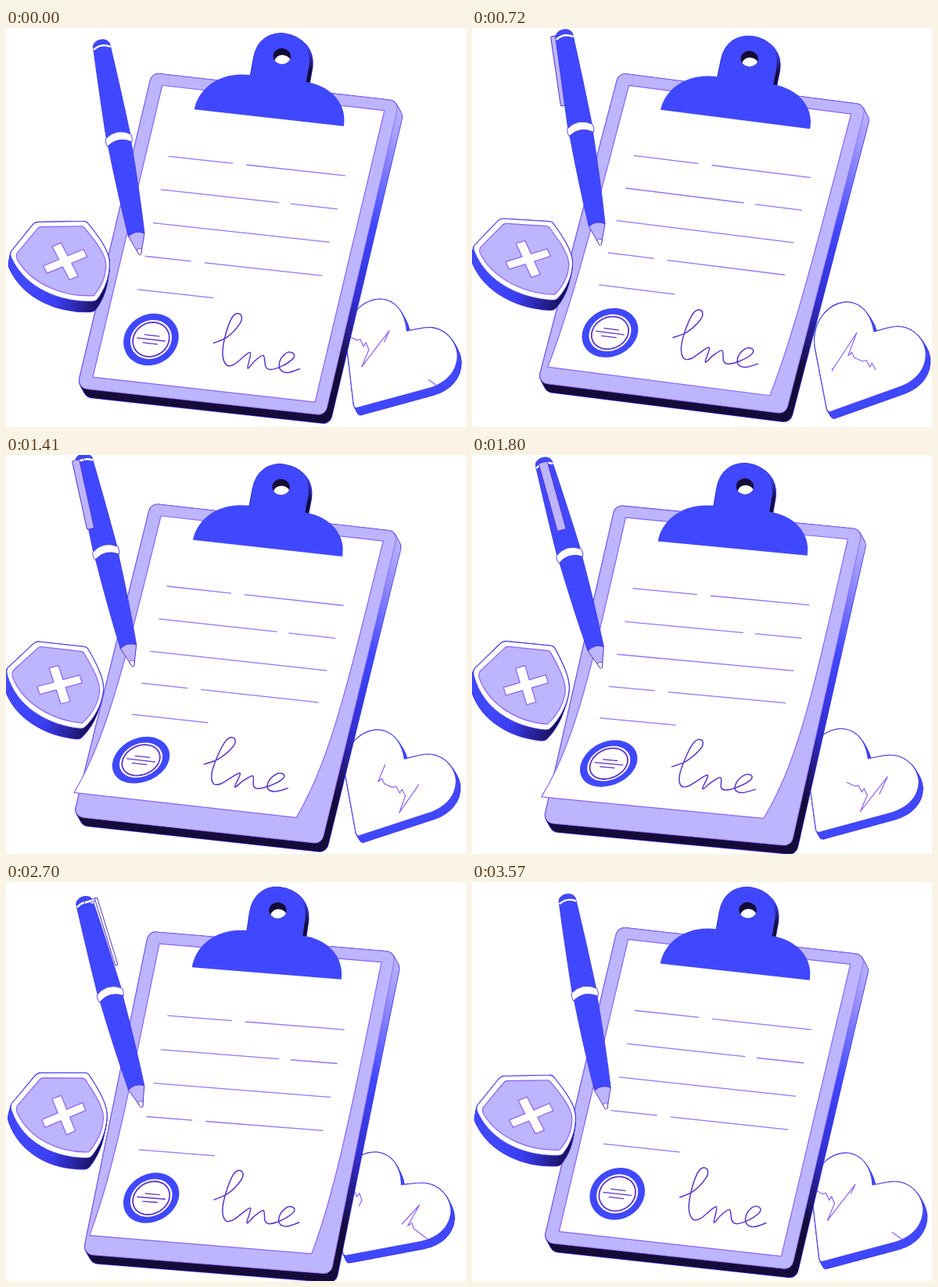
Recreate the animation shown at these times as an HTML page with a canvas. Size 588x511 px, loop 3600 ms.

```html
<!DOCTYPE html>
<html lang="en">
<head>
<meta charset="utf-8">
<title>Clipboard</title>
<style>
  html, body { margin: 0; width: 100%; height: 100%; overflow: hidden; background: #fff; }
  canvas { display: block; width: 588px; height: 511px; }
</style>
</head>
<body>
<canvas id="stage" width="588" height="511"></canvas>
<script>
const ctx = document.getElementById('stage').getContext('2d');
const LOOP = 3600, TAU = 2 * Math.PI;
const BLUE = '#4048ff', LILAC = '#bdb5ff', DARK = '#150b38';
const EDGE = '#3f35e6', VIOLET = '#8d62fa', INK = '#5a34c8', WHITE = '#fff';

// Everything sways once per loop: a middle, a swing and the angle of its peak.
let turn = 0;
const wave = (mid, swing, peak) => mid + swing * Math.cos(turn - peak * TAU / 360);

const range = (n, f) => Array.from({ length: n }, (_, i) => f(i));
const basis = ([ox, oy], [ax, ay], [bx, by]) => new DOMMatrix([ax, ay, bx, by, ox, oy]);

// Carries a shape drawn around `rest` (origin and two arms) to where `now` is.
function pose(rest, now, draw) {
  ctx.save();
  ctx.setTransform(basis(...now).multiply(basis(...rest).inverse()));
  draw();
  ctx.restore();
}

function paint(path, fill, line, width = 1) {
  if (fill) { ctx.fillStyle = fill; ctx.fill(path); }
  if (line) { ctx.strokeStyle = line; ctx.lineWidth = width; ctx.stroke(path); }
}

function extrude(path, dx, dy, fill) {
  const steps = 12;
  for (const outline of [true, false]) {
    for (let i = steps; i >= 0; i--) {
      ctx.save();
      ctx.translate(dx * i / steps, dy * i / steps);
      paint(path, outline ? null : fill, outline ? EDGE : null, 1.6);
      ctx.restore();
    }
  }
}

function gradient(x0, y0, x1, y1, stops) {
  const g = ctx.createLinearGradient(x0, y0, x1, y1);
  stops.forEach(([p, c]) => g.addColorStop(p, c));
  return g;
}

function poly(pts, closed) {
  const p = new Path2D();
  pts.forEach(a => p.lineTo(...a));
  if (closed) p.closePath();
  return p;
}

function rounded(pts, r) {
  const p = new Path2D(), last = pts[pts.length - 1];
  p.moveTo((last[0] + pts[0][0]) / 2, (last[1] + pts[0][1]) / 2);
  pts.forEach((a, i) => p.arcTo(...a, ...pts[(i + 1) % pts.length], r));
  p.closePath();
  return p;
}

function smooth(pts) {
  const p = new Path2D();
  p.moveTo(...pts[0]);
  for (let i = 0; i < pts.length - 1; i++) {
    const a = pts[i - 1] || pts[i], b = pts[i], c = pts[i + 1], d = pts[i + 2] || c;
    p.bezierCurveTo(b[0] + (c[0] - a[0]) / 6, b[1] + (c[1] - a[1]) / 6,
      c[0] - (d[0] - b[0]) / 6, c[1] - (d[1] - b[1]) / 6, ...c);
  }
  return p;
}

function ellipse(x, y, rx, ry) {
  const p = new Path2D();
  p.ellipse(x, y, rx, ry, 0.1, 0, TAU);
  return p;
}

// Heart with a running pulse
const heartFace = new Path2D('M512 387C510 362 496 347 478 347C455 348 433 371 435 402L445 483' +
  'Q446 488 451 486L542 459C563 452 577 437 577 416C575 394 556 380 538 382C528 383 518 386 512 387Z');
const beat = 'l8 4 5-1 4 9 3-5 4 9-9 22 35-47-13 29', pause = 'l5-4 3 7';
const pulse = document.createElementNS('http://www.w3.org/2000/svg', 'path');
pulse.setAttribute('d', 'M440 396' + beat + pause + 'l2 1' + beat + pause + 'l18 12');
const pulsePath = new Path2D(pulse.getAttribute('d')), pulseLength = pulse.getTotalLength();

function drawHeart() {
  extrude(heartFace, 5, 9, BLUE);
  paint(heartFace, WHITE, EDGE, 0.7);
  ctx.clip(heartFace);
  ctx.setLineDash([150, pulseLength - 150]);
  ctx.lineDashOffset = 12 - pulseLength * turn / TAU;
  paint(pulsePath, null, VIOLET, 1.2);
}

// Shield
const shieldFace = new Path2D('M41 246L98 248Q102 248 104 251C118 270 129 287 129 301' +
  'C129 319 121 336 111 347Q109 349 105 349C66 348 22 330 5 289Q3 284 5 281L34 249Q37 246 41 246Z');
const shieldInner = new Path2D('M45 252L94 254Q98 254 100 257C112 273 124 289 124.5 303' +
  'C124 319 116 333 107 342C70 342 29 324 12 291Q11 287 12 284L39 255Q41 252 45 252Z');
// A quarter of the cross, turned four times.
const cross = poly(range(4, i => [[0.22, -1], [0.22, -0.22], [1, -0.22]].map(([x, y]) => {
  for (let k = 0; k < i; k++) [x, y] = [-y, x];
  return [73 + 26 * x + 10 * y, 297 - 9 * x + 21.5 * y];
})).flat(), true);

function drawShield() {
  extrude(shieldFace, -3, 13, gradient(30, 0, 120, 0, [[0, BLUE], [0.35, '#3a3df0'], [1, '#170d50']]));
  paint(shieldFace, WHITE, EDGE, 0.7);
  paint(shieldInner, LILAC, VIOLET, 1.2);
  paint(cross, WHITE, VIOLET, 1.2);
}

// Clipboard
const boardFace = rounded([[187, 57], [503, 94], [408, 497], [91, 461]], 11);
const neckEdge = 'L317 38C321 15 338 5 356 7C378 10 390 26 388 47L384 69';
const neck = new Path2D('M313 60' + neckEdge + 'Z');
const clip = new Path2D('M241 104C246 78 272 55 313 60' + neckEdge + 'C416 74 437 98 432 126Z');
const rows = [[0, 0.365, 0.44, 1], [0, 0.67, 0.735, 1], [0, 1], [0, 0.26, 0.335, 1], [0, 0.43]];
const signature = [[265, 404], [283, 396], [299, 379], [301, 369], [295, 366], [288, 373], [280, 396],
  [277, 418], [282, 432], [292, 431], [312, 416], [309, 436], [318, 427], [329, 420], [332, 434],
  [338, 438], [352, 434], [366, 425], [368, 418], [360, 416], [351, 425], [350, 437], [360, 442], [376, 437]];

// The sheet lies flat at the start of the loop, then its foot curls up and back.
function curl([x, y]) {
  const v = Math.max(0, (284 * (y - 73) - 33 * (x - 200)) / 109153);
  const lift = (1 - Math.cos(turn)) / 2;
  return [x - 22 * lift * v ** 5, y - 19 * lift * v ** 3];
}

function drawPaper() {
  const side = (x, y) => range(21, i => curl([x - 89 * i / 20, y + 374 * i / 20]));
  paint(poly([...side(200, 73), ...side(484, 106).reverse()], true), WHITE, VIOLET, 1.2);

  rows.forEach((stops, k) => {
    const ends = stops.map(u => curl([208 - 10 * k + 226 * u, 164 + 42.7 * k + 25.5 * u]));
    for (let i = 0; i < ends.length; i += 2) paint(poly(ends.slice(i, i + 2)), null, '#9873fb', 1.3);
  });

  const spot = (a, b) => curl([185.5 + 34.4 * a - 7.9 * b, 399 + 4 * a + 33.1 * b]);
  const ring = r => poly(range(60, i => spot(r * Math.cos(i * TAU / 60), r * Math.sin(i * TAU / 60))), true);
  paint(ring(1), BLUE);
  paint(ring(0.75), WHITE);
  paint(ring(0.66), null, INK, 1.8);
  for (const k of [-1, 0, 1]) {
    const half = k ? 0.28 : 0.53;
    paint(poly([spot(-half, 0.155 * k), spot(half, 0.155 * k)]), null, INK, 1.3);
  }

  paint(smooth(signature.map(curl)), null, INK, 1.5);
}

function drawBoard() {
  extrude(boardFace, 6, 11, gradient(503, 94, 456, 503,
    [[0, LILAC], [0.1, '#a39bff'], [0.38, BLUE], [0.62, '#322ed0'], [0.84, DARK]]));
  paint(boardFace, LILAC, VIOLET, 0.8);
  drawPaper();

  extrude(neck, 4, 3, gradient(0, 22, 0, 52, [[0, BLUE], [1, DARK]]));
  paint(clip, BLUE);
  const hole = ellipse(353, 36, 11.2, 10.2);
  paint(hole, DARK);
  ctx.clip(hole);
  paint(ellipse(354, 43.5, 10.5, 9), WHITE);
}

// Pen: local y runs from the cap (0) to the nib (280)
const cap = new Path2D('M-11 9C-11 -3 11 -3 11 9Q14 70 15.5 125Q0 116 -15.5 125Q-14 70 -11 9Z');
const capBand = new Path2D('M-11 11Q0 4 11 11');
const barrel = new Path2D('M-15 134Q0 125 15 134Q14 200 10.5 254Q0 247 -10.5 254Q-14 200 -15 134Z');
const band = new Path2D('M-16.5 126Q0 114 16.5 126Q18 131 16 136Q0 125 -16 136Q-18 131 -16.5 126Z');
const cone = new Path2D('M-10.5 254Q0 247 10.5 254L1.5 279L-1.5 279Z');
const nib = new Path2D('M-3.4 273Q0 271 3.4 273L1.2 280L-1.2 280Z');

function drawPenClip(spin) {
  const s = Math.sin(spin), c = Math.abs(Math.cos(spin));
  const top = 15.5 * s, end = 18 * s, w = 4.2 * c + 1.5;
  paint(poly([[0, 6], [top, 6], [top, 9], [0, 10]], true), WHITE, EDGE, 0.8);
  paint(rounded([[top - w, 6], [top + w, 6], [end + w, 96], [end - w, 96]], 1.5),
    c > 0.3 ? LILAC : WHITE, INK, 1);
}

function drawPen() {
  const spin = turn - 183 * TAU / 360, front = Math.cos(spin) > 0;
  ctx.save();
  ctx.translate(wave(168.3, 6.2, 300), wave(281.8, 11, 322));
  ctx.rotate(-Math.asin(wave(63, -17.5, 45) / 280));
  ctx.translate(0, -280);
  if (!front) drawPenClip(spin);
  paint(cap, BLUE, EDGE, 0.8);
  paint(capBand, null, WHITE, 2.4);
  paint(cone, LILAC, INK, 0.9);
  paint(nib, WHITE, INK, 0.8);
  paint(barrel, BLUE, EDGE, 0.8);
  paint(band, WHITE, EDGE, 0.8);
  if (front) drawPenClip(spin);
  ctx.restore();
}

function render(time) {
  turn = TAU * (time % LOOP) / LOOP;
  ctx.fillStyle = WHITE;
  ctx.fillRect(0, 0, 588, 511);
  ctx.lineJoin = 'round';

  pose([[480, 347], [102, 75], [-28, 148]], [
    [wave(477, 3.5, 20), wave(349, 3.2, 122)],
    [wave(102, 4.5, 95), wave(75, 7.5, 290)],
    [wave(-28, 11, 95), wave(144, 5, 45)]
  ], drawHeart);

  pose([[187, 57], [316, 37], [-96, 404]], [
    [wave(185, 3, 55), wave(61, 4.2, 215)],
    [316, wave(33.5, 7.5, 70)],
    [wave(-94, -10, 80), wave(405, -8.5, 80)]
  ], drawBoard);

  const corner = [wave(104.3, 1.2, 235), wave(248, 2, 50)];
  pose([[103, 250], [-99, 31], [7, 99]], [
    corner,
    [wave(4, 2.8, 305) - corner[0], wave(280, 7.5, 328) - corner[1]],
    [wave(107, 8.5, 350) - corner[0], wave(351, 2.5, 240) - corner[1]]
  ], drawShield);

  drawPen();
}

let start;
function tick(now) {
  start ??= now;
  render(Math.max(0, now - start));
  requestAnimationFrame(tick);
}
render(0);
requestAnimationFrame(tick);
</script>
</body>
</html>
```
